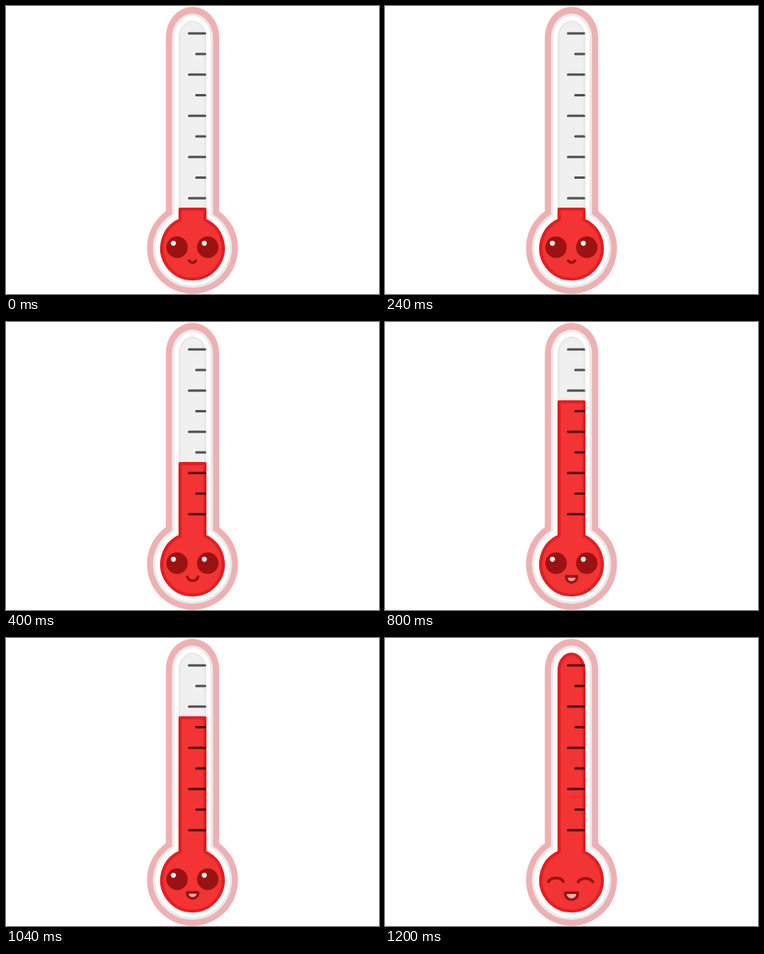
Write an HTML page that moves like this. It is 467 by 360 pixels and loops after 1600 ms.

```html
<!DOCTYPE html>
<html lang="en">
<head>
<meta charset="utf-8">
<title>Thermometer</title>
<style>
  html, body { margin: 0; width: 100%; height: 100%; overflow: hidden; background: #fff; }
  svg { display: block; width: 467px; height: 360px; }
</style>
</head>
<body>
<svg viewBox="0 0 467 360" fill="none" stroke-linecap="round" stroke-linejoin="round">
  <g id="glass"></g>
  <path id="liquid" fill="#f23434" stroke="#e31e22" stroke-width="4"/>
  <path id="ticks" stroke="#000" stroke-opacity=".65" stroke-width="3"/>
  <g id="openEyes">
    <g fill="#9c1212"><circle cx="214.2" cy="301.5" r="13.4"/><circle cx="252.6" cy="301.5" r="13.4"/></g>
    <g fill="#fff"><circle cx="209.6" cy="296.6" r="3.1"/><circle cx="248.3" cy="296.6" r="3.1"/></g>
  </g>
  <path id="closedEyes" stroke="#9c1212" stroke-width="3.6" d="M204.7 304.3Q207 300 214 300T223.3 304.3M241.7 304.8Q245 300.5 251 300.5T260.3 304.8"/>
  <path id="mouth" stroke="#9c1212" stroke-width="3.4"/>
</svg>
<script>
const CENTER = 233.5, BULB_Y = 302.7, STEP = 400;
const $ = id => document.getElementById(id);

// A tube with an elliptical cap that runs into a round bulb.
function thermometer(half, top, cap, radius) {
  const left = CENTER - half, right = CENTER + half;
  const neck = BULB_Y - Math.sqrt(radius ** 2 - half ** 2);
  return `M${left} ${neck}V${top + cap}A${half} ${cap} 0 0 1 ${right} ${top + cap}` +
    `V${neck}A${radius} ${radius} 0 1 1 ${left} ${neck}Z`;
}

const layers = [
  ['#eeb1b3', 33.4, 1, 38, 57],
  ['#ebebeb', 25.7, 9.5, 30, 49.5],
  ['#fff', 22.5, 12.5, 27, 46.5],
  ['#e8e8e8', 17.5, 18, 22, 40.5],
  ['#f0f0f0', 15, 20.5, 19, 38]
];
$('glass').innerHTML = layers.map(([color, ...shape]) =>
  `<path fill="${color}" d="${thermometer(...shape)}"/>`).join('');

$('ticks').setAttribute('d', Array.from({ length: 9 }, (_, i) =>
  `M${i % 2 ? 238.3 : 229.2} ${34.3 + i * 25.74}H249.2`).join(''));

const poses = [
  { top: 253.9, cap: 0, mouth: 'M229.3 318.3Q233.5 323.4 237.7 318.3' },
  { top: 176.9, cap: 0, mouth: 'M227 318.5C229 325 238.5 325 240.5 318.5' },
  { top: 99.8, cap: 0, mouth: 'M226.8 318H240.4C240.4 328 226.8 328 226.8 318Z', tongue: '#f3b0ae' },
  { top: 20.2, cap: 20, mouth: 'M225.6 318.4H241.4C241.4 330 225.6 330 225.6 318.4Z', tongue: '#f3b0ae', happy: true }
];

function draw(time) {
  const pose = poses[Math.floor(time / STEP) % poses.length];
  $('liquid').setAttribute('d', thermometer(15.5, pose.top, pose.cap, 38.5));
  $('mouth').setAttribute('d', pose.mouth);
  $('mouth').setAttribute('fill', pose.tongue || 'none');
  $('openEyes').style.display = pose.happy ? 'none' : '';
  $('closedEyes').style.display = pose.happy ? '' : 'none';
}

const start = performance.now();
function tick() {
  draw(performance.now() - start);
  requestAnimationFrame(tick);
}
tick();
</script>
</body>
</html>
```
